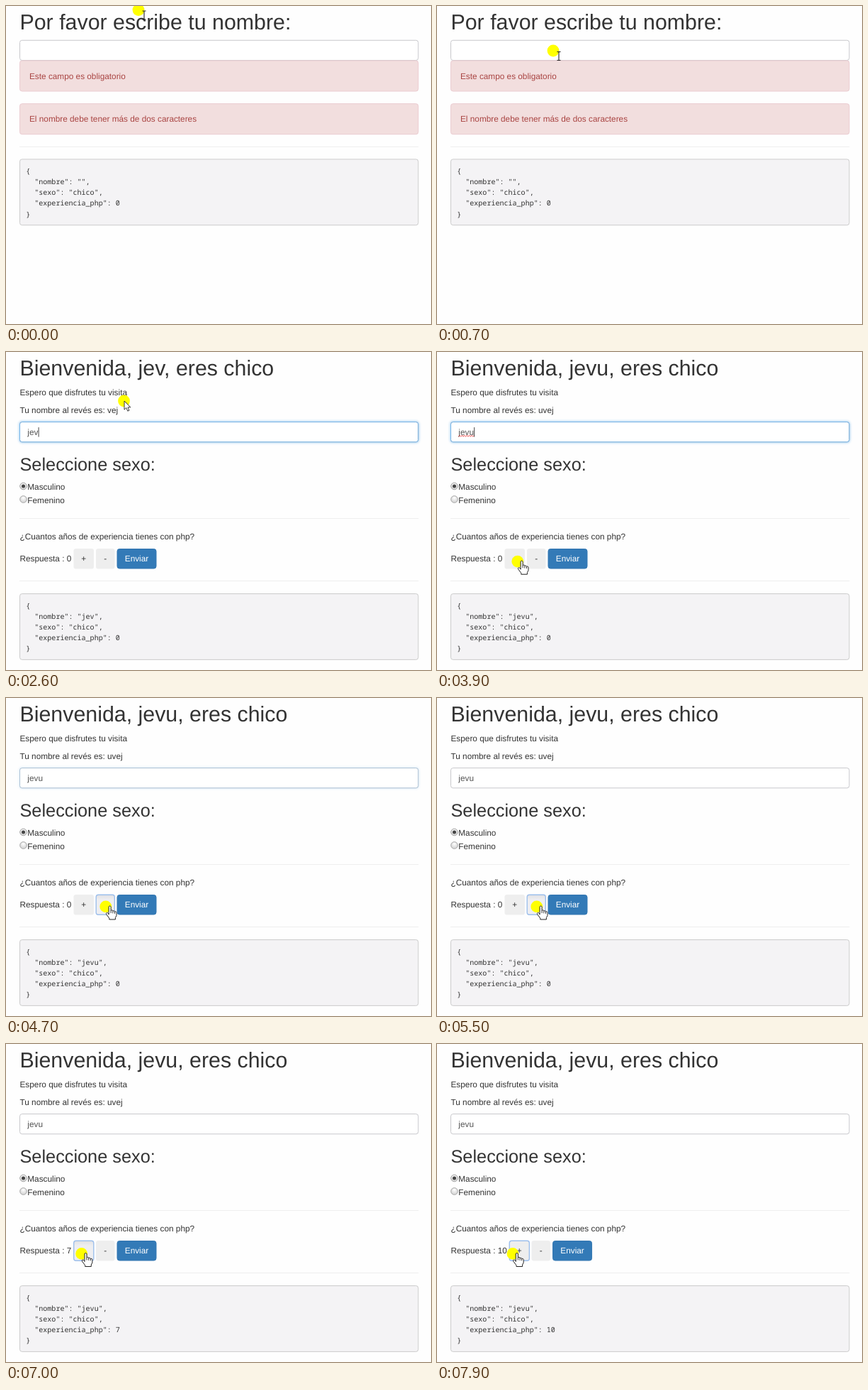
An HTML page for the animation above (8000 ms loop, 600 by 448 pixels).

```html
<!DOCTYPE html>
<html lang="es">
<head>
<meta charset="utf-8">
<title>Formulario</title>
<style>
html, body { margin: 0; width: 100%; height: 100%; overflow: hidden; background: #fefefe; }
svg { display: block; }
text { font: 11.8px "Liberation Sans", Arial, sans-serif; fill: #333; white-space: pre; text-rendering: geometricPrecision; }
.h1 { font-size: 30.35px; }
.h2 { font-size: 25.3px; }
.code { font: 10.05px "Noto Sans Mono", "DejaVu Sans Mono", monospace; }
.error { fill: #a94442; }
.value { fill: #555; }
.send { fill: #fff; }
.mid { text-anchor: middle; }
</style>
</head>
<body>
<svg id="stage" width="600" height="448" viewBox="0 0 600 448">
  <defs>
    <filter id="blur" x="-5%" y="-50%" width="110%" height="200%"><feGaussianBlur stdDeviation="1.6"/></filter>
    <linearGradient id="pressed" x1="0" y1="0" x2="0" y2="1">
      <stop offset="0" stop-color="#e0e0e3"/><stop offset=".25" stop-color="#eeeef1"/>
    </linearGradient>
    <radialGradient id="radio" cy=".3"><stop offset="0" stop-color="#fff"/><stop offset="1" stop-color="#ddd"/></radialGradient>
  </defs>
  <g id="page"></g>
  <g id="pointer"></g>
</svg>
<script>
const LOOP = 8000, LEFT = 19.5, WIDTH = 562.5;
const NAME = 'jevu';
const KEYS = [1800, 2100, 2500, 2800];
const FOCUS = 1000, BLUR = 4600, COUNT_START = 6000, COUNT_STEP = 165, COUNT_MAX = 10;
const ALERT_STEP = 43.8;

// time, hotspot x, hotspot y
const PATH = [
  [0, 195, 13], [700, 172, 70.5], [900, 167, 69], [3300, 167, 69],
  [3900, 119.6, 294.2], [4200, 119.6, 294.2], [4450, 146.6, 293], [5500, 146.6, 293],
  [5750, 112, 294.5], [8000, 112.8, 294.5]
];

const page = document.getElementById('page');
const pointer = document.getElementById('pointer');
const pen = document.createElement('canvas').getContext('2d');
pen.font = '11.8px "Liberation Sans", Arial, sans-serif';
const measure = s => pen.measureText(s).width;
const clamp = v => Math.max(0, Math.min(1, v));

const text = (x, y, s, cls = '') => `<text x="${x}" y="${y}" class="${cls}">${s}</text>`;
const box = (x, y, w, h, fill, stroke = 'none', extra = '') =>
  `<rect x="${x}" y="${y}" width="${w}" height="${h}" rx="3.2" fill="${fill}" stroke="${stroke}" ${extra}/>`;
const rule = y => `<path d="M${LEFT - .5} ${y}h${WIDTH + 1}" stroke="#eee"/>`;

function alertBox(y, message) {
  return box(LEFT, y, WIDTH, 43, '#f2dede', '#ebccd1') + text(33, y + 25.6, message, 'error');
}

function field(y, value, t) {
  const glow = clamp((t - FOCUS) / 150) * (1 - clamp((t - BLUR) / 150));
  const focused = t >= FOCUS && t < BLUR;
  const lastKey = [FOCUS, ...KEYS].filter(k => k <= t).pop();
  const end = 30.3 + measure(value);
  let out = '';
  if (glow) out += box(LEFT, y, WIDTH, 28.2, 'none', '#66afe9', `stroke-width="3" opacity="${glow * .5}" filter="url(#blur)"`);
  out += box(LEFT, y, WIDTH, 28.2, '#fff', '#c8c8cc');
  if (glow) out += box(LEFT, y, WIDTH, 28.2, 'none', '#74b4e8', `opacity="${glow}"`);
  out += text(30.3, y + 18.2, value, 'value');
  if (focused && value === NAME && t > 2900) {
    let d = `M30.3 ${y + 20.5}`;
    for (let x = 30.3, up = 1; x < end - 1; x += 1.7, up = -up) d += `l1.7 ${-1.6 * up}`;
    out += `<path d="${d}" fill="none" stroke="#e33" stroke-width=".9"/>`;
  }
  if (focused && (t - lastKey) % 1000 < 500)
    out += `<path d="M${end + .7} ${y + 7.5}v13.5" stroke="#333" stroke-width=".9"/>`;
  return out;
}

function radio(y, label, on) {
  return `<circle cx="24.5" cy="${y}" r="4.8" fill="url(#radio)" stroke="#999" stroke-width=".9"/>` +
    (on ? `<circle cx="24.5" cy="${y}" r="2.5" fill="#444"/>` : '') + text(30.3, y + 5.4, label);
}

function button(x, y, w, label, focused, down) {
  let out = box(x, y, w, 28.5, down ? 'url(#pressed)' : '#eee');
  if (focused) out += box(x + .2, y + .3, w - .4, 28, 'none', '#9dbfec', 'stroke-width="1.4"');
  return out + text(x + w / 2, y + 18.2, label, 'mid');
}

function questions(y, count, t) {
  const minusFocus = t >= BLUR && t < COUNT_START, plusFocus = t >= COUNT_START;
  const minusDown = minusFocus && t < 5580 && (t - BLUR) % 220 < 110;
  const plusDown = plusFocus && t < 7850 && (t - COUNT_START) % COUNT_STEP < 70;
  const shift = measure(String(count)) - measure('0');
  return text(LEFT, y + 8.8, 'Seleccione sexo:', 'h2') +
    radio(y + 31, 'Masculino', true) + radio(y + 49.5, 'Femenino', false) +
    rule(y + 76.5) +
    text(LEFT, y + 106.2, '¿Cuantos años de experiencia tienes con php?') +
    text(LEFT, y + 137, 'Respuesta : ' + count) +
    `<g transform="translate(${shift})">` +
    button(95.5, y + 119, 28.5, '+', plusFocus, plusDown) +
    button(127, y + 119, 26.5, '-', minusFocus, minusDown) +
    box(157, y + 119.5, 55, 27.5, '#337ab7', '#3276b1') + text(184.5, y + 137.4, 'Enviar', 'mid send') +
    '</g>' + rule(y + 164.6);
}

function dump(y, value, count) {
  const lines = ['{', `  "nombre": "${value}",`, '  "sexo": "chico",', `  "experiencia_php": ${count}`, '}'];
  return box(LEFT, y, WIDTH, 92.8, '#f4f3f5', '#ccc') +
    lines.map((s, i) => text(28.2, y + 20 + i * 15.15, s, 'code')).join('');
}

function drawPage(t) {
  const value = NAME.slice(0, KEYS.filter(k => k <= t).length);
  const count = t < COUNT_START ? 0 : Math.min(COUNT_MAX, 1 + Math.floor((t - COUNT_START) / COUNT_STEP));
  const short = 'El nombre debe tener más de dos caracteres';
  if (!value)
    return text(LEFT, 33.2, 'Por favor escribe tu nombre:', 'h1') + field(48.3, '', t) +
      alertBox(77, 'Este campo es obligatorio') + alertBox(137.7, short) +
      rule(198.3) + dump(215.9, value, count);
  const tooShort = value.length < 3;
  const y = 158 + (tooShort ? ALERT_STEP : 0);
  return text(LEFT, 33.2, `Bienvenida, ${value}, eres chico`, 'h1') +
    text(LEFT, 60.6, 'Espero que disfrutes tu visita') +
    text(LEFT, 85.9, 'Tu nombre al revés es: ' + [...value].reverse().join('')) +
    field(98.6, value, t) + (tooShort ? alertBox(127.5, short) : '') +
    questions(y, count, t) + dump(y + 182.6, value, count);
}

function hotspot(t) {
  const i = PATH.findIndex((p, k) => k && t <= p[0]);
  const [t0, x0, y0] = PATH[i - 1], [t1, x1, y1] = PATH[i];
  const u = (t - t0) / (t1 - t0), e = u * u * (3 - 2 * u);
  return [x0 + (x1 - x0) * e, y0 + (y1 - y0) * e];
}

const SHAPES = {
  beam: { halo: [-8, -7.5], draw: '<path d="M-2.5-6h2l.5.6.5-.6h2M0-5.4V5.4M-2.5 6h2l.5-.6.5.6h2" fill="none" stroke="#222" stroke-width="1.1"/>' },
  arrow: { halo: [-.5, 0], draw: '<path d="M0 0V12.2L2.8 9.6 4.8 14.2 6.9 13.3 5 8.9H8.8Z" fill="#fff" stroke="#222" stroke-width=".9"/>' },
  hand: { halo: [-5.8, .9], draw: '<path d="M-1.5 12V1.5Q-1.4 0 0 0T1.5 1.5V6.6Q2 5.6 3.2 5.9T4.3 7.5Q4.9 6.4 6 6.9T6.9 8.4Q7.6 7.4 8.6 8T9.4 9.6V13.5L7.8 16.5V19H-.8V17.3L-5 11.6Q-5.6 10.2-4.4 9.6T-2.2 10.8Z" fill="#fff" stroke="#222"/><path d="M1.5 6.6V10M4.3 7.5V10.4M6.9 8.4V10.8" stroke="#222" stroke-width=".9"/>' }
};

function drawPointer(t) {
  const [x, y] = hotspot(t);
  let kind = 'arrow';
  if (t < KEYS[0]) kind = y < 40 || y > 48 ? 'beam' : 'arrow';
  else if (y > 277) kind = 'hand';
  else if ((y > 98 && y < 127) || (y > 145 && y < 170) || (y > 253 && y < 268)) kind = 'beam';
  const { halo, draw } = SHAPES[kind];
  return `<g transform="translate(${x.toFixed(2)} ${y.toFixed(2)})"><circle cx="${halo[0]}" cy="${halo[1]}" r="8.4" fill="#ff0"/>${draw}</g>`;
}

const shown = new Map();
function update(node, markup) {
  if (shown.get(node) === markup) return;
  shown.set(node, markup);
  node.innerHTML = markup;
}

function render(t) {
  update(page, drawPage(t));
  update(pointer, drawPointer(t));
}

const start = performance.now();
function tick() {
  render((performance.now() - start) % LOOP);
  requestAnimationFrame(tick);
}
tick();
</script>
</body>
</html>
```
